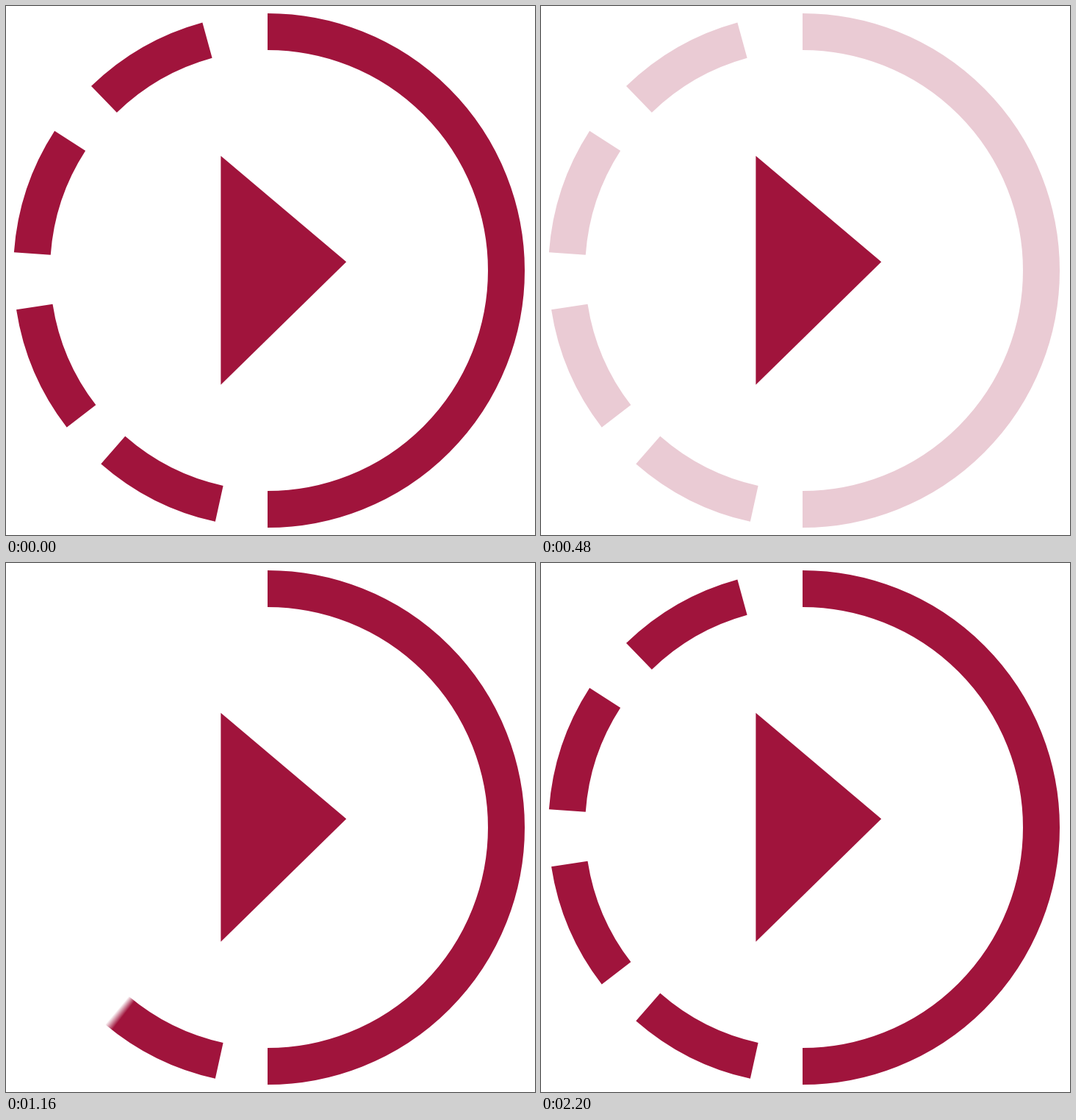
Animation of 720x720 px, one loop 3000 ms. Source, as an HTML page with a canvas:

```html
<!DOCTYPE html>
<html lang="en">
<head>
<meta charset="utf-8">
<title>Play ring</title>
<style>
  html, body { margin: 0; width: 100%; height: 100%; overflow: hidden; background: #fff; }
  canvas { display: block; width: 720px; height: 720px; }
</style>
</head>
<body>
<canvas id="stage" width="720" height="720"></canvas>
<script>
const ctx = document.getElementById('stage').getContext('2d');
const LOOP = 3000, STEP = 40, SHUTTER = 20;
const CY = 360, RADIUS = 325, WIDTH = 50;
const BASE = [160, 20, 60], FLASH = [228, 62, 114];

// Angles run clockwise in degrees from the top; times are in ms.
const half = { cx: 356, from: 0, to: 180, start: 597, length: 360 };
const dashes = [192.4, 232.4, 274.05, 315.8].map((from, i) => (
  { cx: 360, from, to: from + 28.85, start: 1042 + 320 * i, length: 180 }
));
const arcs = [half, ...dashes];

const clamp = x => Math.min(1, Math.max(0, x));
const smooth = x => x * x * (3 - 2 * x);
// Closed form of cubic-bezier(1, 0, 0, 1)
const sharp = x => smooth(0.5 + 0.5 * Math.cbrt(2 * x - 1));
const progress = (t, start, length) => clamp((t - start) / length);
const radians = deg => (deg - 90) * Math.PI / 180;
const rgba = (c, a = 1) => `rgba(${c.join(',')},${a})`;

function strokeArc({ cx, from }, to, style) {
  ctx.beginPath();
  ctx.arc(cx, CY, RADIUS, radians(from), radians(to));
  ctx.lineWidth = WIDTH;
  ctx.strokeStyle = style;
  ctx.stroke();
}

// The moving tip is softened over the time the shutter is open.
function growArc(arc, t) {
  const tip = time => arc.from +
    (arc.to - arc.from) * sharp(progress(time, arc.start, arc.length));
  const near = tip(t - SHUTTER / 2), far = tip(t + SHUTTER / 2);
  if (far - arc.from < 0.01) return;
  if (far - near < 0.05) return strokeArc(arc, far, rgba(BASE));
  const fade = ctx.createConicGradient(radians(0), arc.cx, CY);
  fade.addColorStop(near / 360, rgba(BASE));
  fade.addColorStop(far / 360, rgba(BASE, 0));
  strokeArc(arc, far, fade);
}

function drawTriangle(t) {
  const press = smooth(t < 200 ? t / 200 : 1 - progress(t, 200, 200));
  const color = BASE.map((v, i) => Math.round(v + (FLASH[i] - v) * press));
  const scale = 1 - 0.025 * press;
  ctx.save();
  ctx.translate(378, 360);
  ctx.scale(scale, scale);
  ctx.translate(-378, -360);
  ctx.beginPath();
  ctx.moveTo(292.4, 204);
  ctx.lineTo(463.2, 348.2);
  ctx.lineTo(292.4, 515.5);
  ctx.closePath();
  ctx.fillStyle = rgba(color);
  ctx.fill();
  ctx.restore();
}

function draw(t) {
  ctx.clearRect(0, 0, 720, 720);
  drawTriangle(t);
  if (t < 600) {
    const alpha = 1 - smooth(progress(t, 240, 345));
    arcs.forEach(a => strokeArc(a, a.to, rgba(BASE, alpha)));
  } else {
    arcs.forEach(a => growArc(a, t));
  }
}

const origin = performance.now();
function tick() {
  const t = (performance.now() - origin) % LOOP;
  draw(Math.floor(t / STEP) * STEP);
  requestAnimationFrame(tick);
}
tick();
</script>
</body>
</html>
```
